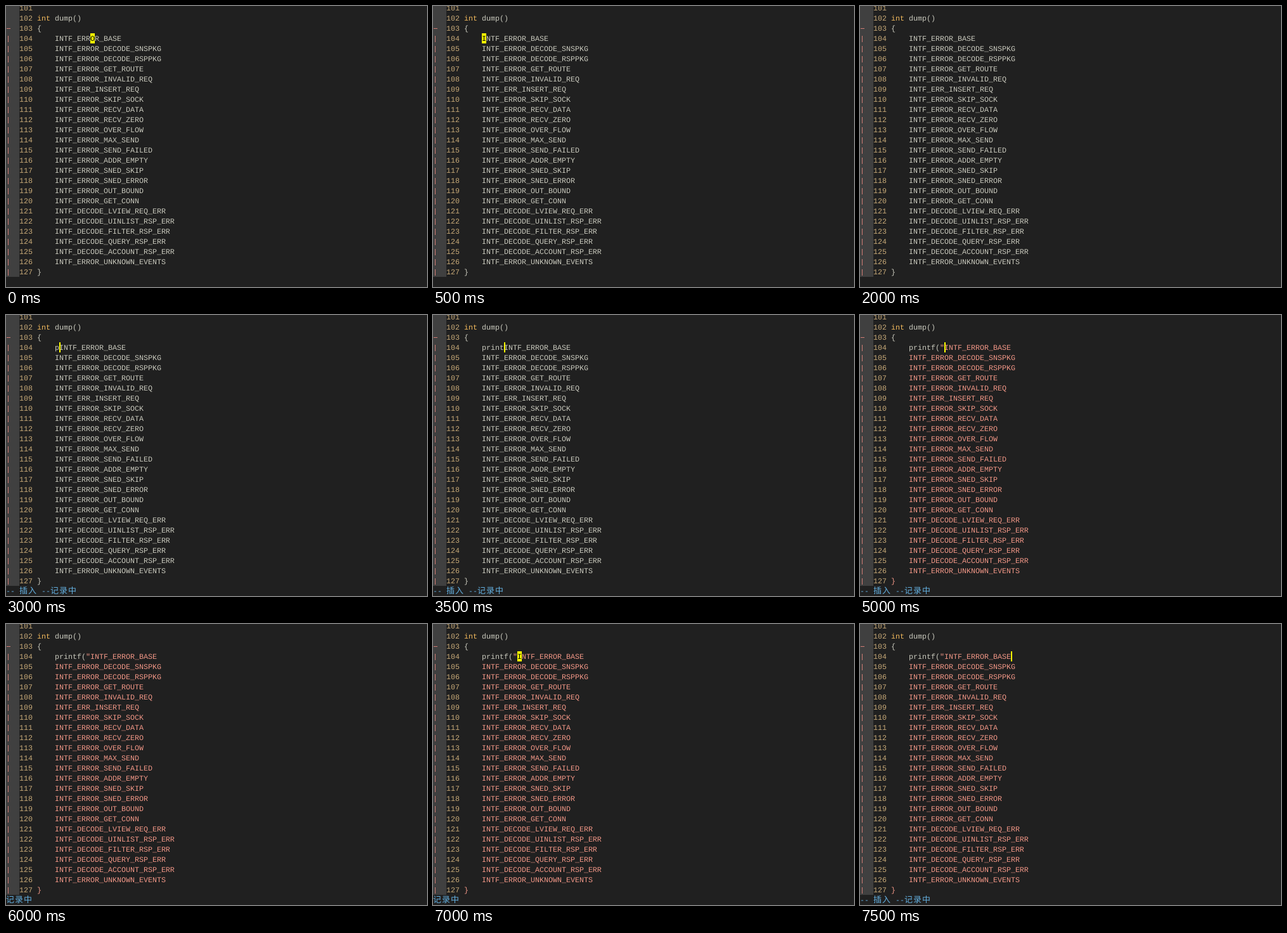
An HTML page for the animation above (8 s loop, 664x443 px).

```html
<!DOCTYPE html>
<html lang="zh">
<head>
<meta charset="utf-8">
<title>Macro recording</title>
<style>
html, body { margin: 0; width: 100%; height: 100%; overflow: hidden; background: #202020; }
svg { display: block; }
text {
  font-family: "Liberation Mono", monospace;
  font-size: 11.667px;
  white-space: pre;
  text-rendering: geometricPrecision;
  fill: #c8c8bc;
}
.num { fill: #c8aa78; }
.fold { fill: #d07c74; }
.type { fill: #f0b85c; }
.string { fill: #f09686; }
.mode { fill: #64b0e0; }
.cjk { font-family: "Noto Sans CJK SC", "Noto Sans CJK", sans-serif; font-size: 13px; letter-spacing: 1px; }
.dark { fill: #000; }
.light { fill: #fff; }
</style>
</head>
<body>
<svg id="stage" width="664" height="443" viewBox="0 0 664 443">
  <rect width="664" height="443" fill="#202020"/>
  <rect width="21" height="427" fill="#404040"/>
</svg>
<script>
const CELL = 7, ROW = 16, STEP = 500;
const FIRST = 101, EDIT = 104, LAST = 127;
const CODE_X = 49, BODY_X = 77;
const names = `ERROR_BASE ERROR_DECODE_SNSPKG ERROR_DECODE_RSPPKG ERROR_GET_ROUTE
  ERROR_INVALID_REQ ERR_INSERT_REQ ERROR_SKIP_SOCK ERROR_RECV_DATA ERROR_RECV_ZERO
  ERROR_OVER_FLOW ERROR_MAX_SEND ERROR_SEND_FAILED ERROR_ADDR_EMPTY ERROR_SNED_SKIP
  ERROR_SNED_ERROR ERROR_OUT_BOUND ERROR_GET_CONN DECODE_LVIEW_REQ_ERR
  DECODE_UINLIST_RSP_ERR DECODE_FILTER_RSP_ERR DECODE_QUERY_RSP_ERR
  DECODE_ACCOUNT_RSP_ERR ERROR_UNKNOWN_EVENTS`.split(/\s+/).map(n => "INTF_" + n);

// One entry per half second: typed prefix, cursor shape, cursor column, mode
const CALL = 'printf("';
const steps = [
  ["", "block", 8, ""],
  ["", "block", 0, ""],
  ["", "block", 0, ""],
  ["", "block", 0, ""],
  ["", "none", 0, ""],
  ["", "block", 0, "record"],
  ["p", "bar", 1, "insert"],
  ["print", "bar", 5, "insert"],
  ["printf", "bar", 6, "insert"],
  ["printf(", "bar", 7, "insert"],
  [CALL, "bar", 8, "insert"],
  [CALL, "block", 8, "record"],
  [CALL, "none", 8, "record"],
  [CALL, "half", 8, "record"],
  [CALL, "block", 8, "record"],
  [CALL, "bar", 23, "insert"]
];

const stage = document.getElementById("stage");
const rowTop = line => 11 + (line - 102) * ROW;

function add(tag, attrs, parent = stage) {
  const el = document.createElementNS("http://www.w3.org/2000/svg", tag);
  for (const key in attrs) el.setAttribute(key, attrs[key]);
  return parent.appendChild(el);
}

function write(str, x, line, cls = "", parent = stage) {
  const el = add("text", { x, y: rowTop(line) + 12, class: cls }, parent);
  el.textContent = str;
  return el;
}

// Fold column: a dash opens the fold, short bars run down its body
add("rect", { x: 1, y: rowTop(103) + 8, width: 6, height: 1, class: "fold" });
for (let line = FIRST; line <= LAST; line++) {
  write(line, 21, line, "num");
  if (line >= EDIT) add("rect", { x: 3, y: rowTop(line) + 4, width: 1, height: 10, class: "fold" });
}
write("int", CODE_X, 102, "type");
write("dump()", BODY_X, 102);
write("{", CODE_X, 103);

const entries = names.map((name, i) => write(name, BODY_X, EDIT + i));
const typed = write("", BODY_X, EDIT);
const quote = write('"', BODY_X + 7 * CELL, EDIT, "string");

const match = add("rect", { x: CODE_X, y: rowTop(LAST), width: CELL, height: ROW, fill: "#f00000" });
const brace = write("}", CODE_X, LAST);

const insert = add("g", {});
write("--", 0, LAST + 1, "mode", insert);
write("插入", 21, LAST + 1, "mode cjk", insert);
write("--", 56, LAST + 1, "mode", insert);
const record = write("记录中", 0, LAST + 1, "mode cjk");

const cursor = add("rect", { fill: "#ff0" });
const under = write("", 0, EDIT, "dark");
const shapes = { none: [0, 0], block: [CELL, ROW], half: [CELL, ROW / 2], bar: [2, ROW] };

const show = (el, on) => el.setAttribute("visibility", on ? "visible" : "hidden");

function render([prefix, shape, col, mode]) {
  const quoted = prefix === CALL;
  const matched = prefix.endsWith("(");
  const color = quoted ? "string" : "";
  const x = BODY_X + col * CELL;
  const [width, height] = shapes[shape];

  typed.textContent = prefix.replace('"', "");
  show(quote, quoted);
  entries[0].setAttribute("x", BODY_X + prefix.length * CELL);
  for (const el of entries) el.setAttribute("class", color);
  brace.setAttribute("class", matched ? "light" : color);
  show(match, matched);

  cursor.setAttribute("x", x);
  cursor.setAttribute("y", rowTop(EDIT) + ROW - height);
  cursor.setAttribute("width", width);
  cursor.setAttribute("height", height);
  under.setAttribute("x", x);
  under.textContent = shape === "block" ? (prefix + names[0])[col] : "";

  show(insert, mode === "insert");
  show(record, mode);
  record.setAttribute("x", mode === "insert" ? 70 : 0);
}

let current = 0;
render(steps[0]);
const start = performance.now();

function tick() {
  const next = Math.floor((performance.now() - start) / STEP) % steps.length;
  if (next !== current) render(steps[current = next]);
  requestAnimationFrame(tick);
}
requestAnimationFrame(tick);
</script>
</body>
</html>
```
